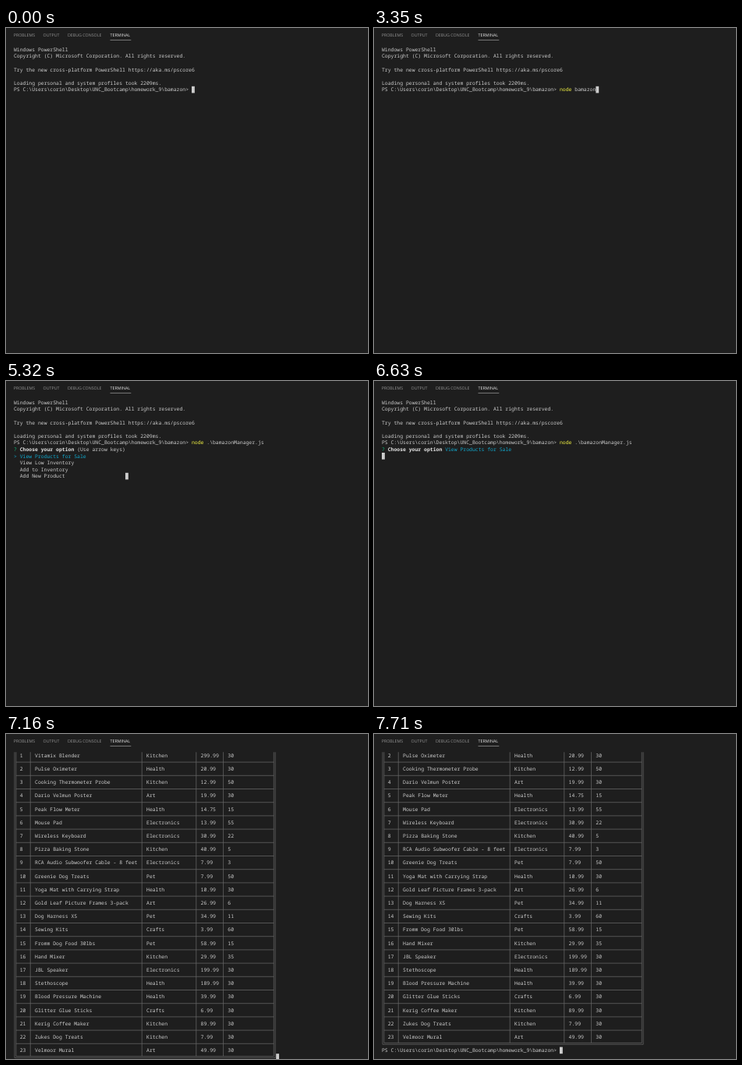
Recreate the animation shown at these times as an HTML page. Size 464 by 417 pixels, loop 8 s.

```html
<!DOCTYPE html>
<html lang="en">
<head>
<meta charset="utf-8">
<title>Terminal session</title>
<style>
  html, body { margin: 0; width: 100%; height: 100%; overflow: hidden; background: #1e1e1e; }
  svg { display: block; width: 464px; height: 417px; }
  text { white-space: pre; text-rendering: geometricPrecision; }
  .tab { font: 5.3px "Open Sans", "Noto Sans", sans-serif; fill: #949494; }
  .tab.on { fill: #e7e7e7; }
  .term text { font: 6.44px "Noto Sans Mono", "DejaVu Sans Mono", monospace; fill: #cccccc; }
  .term .cmd { fill: #f5f543; }
  .term .ask { fill: #0dbc79; }
  .term .bold { fill: #e5e5e5; font-weight: 700; }
  .term .pick { fill: #11a8cd; }
  .term .head { fill: #cd3131; }
  .rule { fill: none; stroke: #666; stroke-width: .75; }
</style>
</head>
<body>
<svg viewBox="0 0 464 417" xmlns="http://www.w3.org/2000/svg">
  <defs><clipPath id="view"><rect y="23.2" width="464" height="394"/></clipPath></defs>
  <rect width="464" height="417" fill="#1e1e1e"/>
  <text class="tab" x="9.7" y="10.8">PROBLEMS</text>
  <text class="tab" x="47.6" y="10.8">OUTPUT</text>
  <text class="tab" x="79" y="10.8">DEBUG CONSOLE</text>
  <text class="tab on" x="133.6" y="10.8">TERMINAL</text>
  <rect x="133.5" y="15" width="26.8" height=".6" fill="#b0b0b0"/>
  <g clip-path="url(#view)"><g class="term" id="screen"></g></g>
</svg>
<script>
const LOOP = 8000, CW = 3.864, LH = 8.6, LEFT = 10, TOP = 23.2;
const PROMPT = 'PS C:\\Users\\corin\\Desktop\\UNC_Bootcamp\\homework_9\\bamazon>';
const INPUT = PROMPT.length + 1;
const TYPED = 'node bamazonM', COMPLETE = 'node .\\bamazonManager.js';

// [time, characters typed so far]
const keys = [[0, 0], [260, 1], [650, 2], [790, 3], [920, 4], [1190, 5], [1600, 6],
  [1870, 7], [2020, 9], [2280, 10], [2420, 11], [2680, 12], [3480, 13]];

// [time, stage, scrolled lines, cursor line, cursor column]
const phases = [
  [4280, 'wait', 0, 7, 0], [5320, 'menu', 0, 11, 37], [6630, 'answer', 0, 8, 0],
  [6760, 'table', 3, 48, 87], [6890, 'table', 9, 54, 87], [7160, 'table', 11, 56, 87],
  [7300, 'table', 12, 57, 0], [7440, 'table', 13, 58, 0], [7580, 'table', 13, 57, 0],
  [7710, 'done', 13, 57, INPUT]
];

const header = ['ID', 'Product Name', 'Department Name', 'Price', 'Stock Quantity'];
const cols = [2, 7, 44, 62, 71], bars = [5, 42, 60, 69], lastBar = 86;
const goods = `Vitamix Blender|Kitchen|299.99|30
Pulse Oximeter|Health|20.99|30
Cooking Thermometer Probe|Kitchen|12.99|50
Dario Velmun Poster|Art|19.99|30
Peak Flow Meter|Health|14.75|15
Mouse Pad|Electronics|13.99|55
Wireless Keyboard|Electronics|30.99|22
Pizza Baking Stone|Kitchen|40.99|5
RCA Audio Subwoofer Cable - 8 feet|Electronics|7.99|3
Greenie Dog Treats|Pet|7.99|50
Yoga Mat with Carrying Strap|Health|10.99|30
Gold Leaf Picture Frames 3-pack|Art|26.99|6
Dog Harness XS|Pet|34.99|11
Sewing Kits|Crafts|3.99|60
Fromm Dog Food 30lbs|Pet|58.99|15
Hand Mixer|Kitchen|29.99|35
JBL Speaker|Electronics|199.99|30
Stethoscope|Health|189.99|30
Blood Pressure Machine|Health|39.99|30
Glitter Glue Sticks|Crafts|6.99|30
Kerig Coffee Maker|Kitchen|89.99|30
Zukes Dog Treats|Kitchen|7.99|30
Velmoor Mural|Art|49.99|30`.split('\n').map((s, i) => [i + 1, ...s.split('|')]);

const colX = c => LEFT + c * CW;
const lineY = n => TOP + n * LH;
const escape = s => String(s).replace(/&/g, '&amp;').replace(/</g, '&lt;').replace(/>/g, '&gt;');
const put = (line, col, s, cls = '') =>
  `<text class="${cls}" x="${colX(col)}" y="${lineY(line) + 6.6}">${escape(s)}</text>`;
const latest = (list, t) => list.filter(e => e[0] <= t).pop();

const intro = put(0, 0, 'Windows PowerShell') +
  put(1, 0, 'Copyright (C) Microsoft Corporation. All rights reserved.') +
  put(3, 0, 'Try the new cross-platform PowerShell https://aka.ms/pscore6') +
  put(5, 0, 'Loading personal and system profiles took 2209ms.') +
  put(6, 0, PROMPT);

const command = s => put(6, INPUT, s.slice(0, 4), 'cmd') + put(6, INPUT + 5, s.slice(5));
const question = put(7, 0, '?', 'ask') + put(7, 2, 'Choose your option', 'bold');
const menu = question + put(7, 21, '(Use arrow keys)') +
  put(8, 0, '> View Products for Sale', 'pick') +
  ['View Low Inventory', 'Add to Inventory', 'Add New Product']
    .map((s, i) => put(9 + i, 2, s)).join('');
const answer = question + put(7, 21, 'View Products for Sale', 'pick');
const table = buildTable();

function buildTable() {
  const first = 8, end = first + 2 * (goods.length + 1);
  const mid = n => lineY(n + .5), x0 = colX(.5), x1 = colX(lastBar + .5);
  const gap = .95, y0 = mid(first), y1 = mid(end);
  const frame = d => `M${x0 - d} ${y0 - d}H${x1 + d}V${y1 + d}H${x0 - d}Z`;
  let path = frame(gap) + frame(-gap);
  for (const b of bars) path += `M${colX(b + .5)} ${y0 + gap}V${y1 - gap}`;
  for (let n = first + 2; n < end; n += 2) path += `M${x0 + gap} ${mid(n)}H${x1 - gap}`;
  const cells = [header, ...goods].map((row, r) =>
    row.map((s, c) => put(first + 1 + 2 * r, cols[c], s, r ? '' : 'head')).join(''));
  return `<path class="rule" d="${path}"/>` + cells.join('');
}

function stateAt(t) {
  const phase = latest(phases, t);
  if (phase) return { text: COMPLETE, stage: phase[1], scroll: phase[2], line: phase[3], col: phase[4] };
  const text = t >= 3870 ? COMPLETE : TYPED.slice(0, latest(keys, t)[1]);
  return { text, stage: 'type', scroll: 0, line: 6, col: INPUT + text.length };
}

const screen = document.getElementById('screen');
let shown = '';

function draw(t) {
  const s = stateAt(t), key = Object.values(s).join();
  if (key === shown) return;
  shown = key;
  let out = intro + command(s.text);
  if (s.stage === 'menu') out += menu;
  if (['answer', 'table', 'done'].includes(s.stage)) out += answer;
  if (['table', 'done'].includes(s.stage)) out += table;
  if (s.stage === 'done') out += put(57, 0, PROMPT);
  out += `<rect x="${colX(s.col)}" y="${lineY(s.line)}" width="${CW}" height="${LH}" fill="#cccccc"/>`;
  screen.setAttribute('transform', `translate(0 ${-s.scroll * LH})`);
  screen.innerHTML = out;
}

const start = performance.now();
function tick() {
  draw((performance.now() - start) % LOOP);
  requestAnimationFrame(tick);
}
tick();
</script>
</body>
</html>
```
